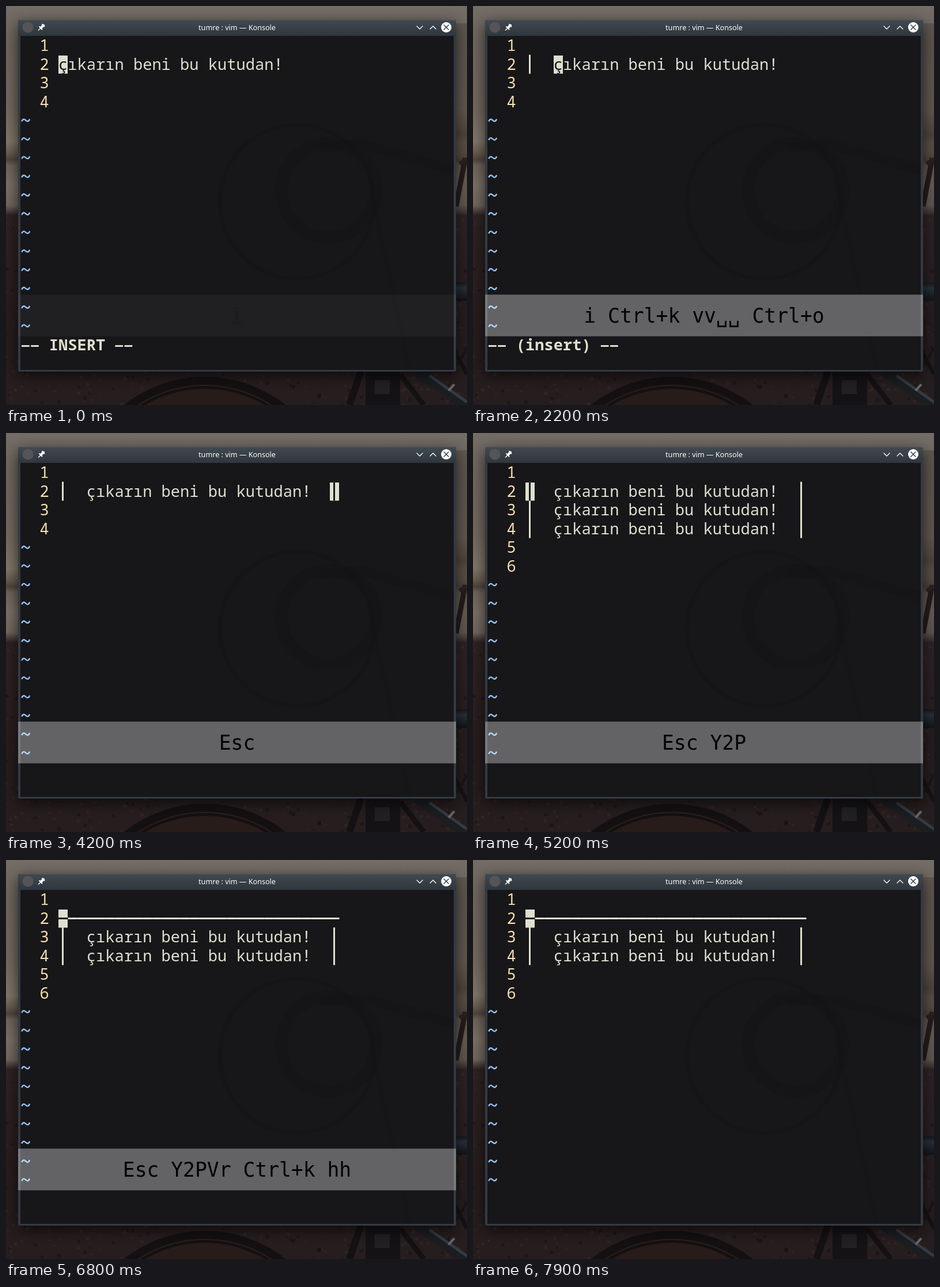
An HTML page with a canvas for the animation above (8 s loop, 800 px wide and 693 px high).

```html
<!DOCTYPE html>
<html lang="tr">
<head>
<meta charset="utf-8">
<title>vim box drawing</title>
<style>
html, body { margin: 0; width: 100%; height: 100%; overflow: hidden; background: #221a1c; }
canvas { display: block; }
</style>
</head>
<body>
<canvas id="stage" width="800" height="693"></canvas>
<script>
const W = 800, H = 693, LOOP = 8000, STEP = 100;
const CELL = 16.24, LINE = 32.45, LEFT = 26, TOP = 52.2, GUTTER = 4, SCREEN_ROWS = 16;
const INK = '#dfdfcf', PAPER = '#171619', NUMBER = '#f5e0ae', TILDE = '#94c4f4', SPECIAL = '#5fd7ff';
const PHRASE = 'çıkarın beni bu kutudan!';

// Key presses: time, label (a leading space separates groups)
const KEYS = [
  [0, 'i'], [500, ' Ctrl+k'], [800, ' v'], [900, 'v'], [1400, '␣'], [1600, '␣'],
  [2000, ' Ctrl+o'], [2300, ' A'], [2500, '␣'], [2700, '␣'],
  [3000, ' Ctrl+k'], [3200, ' v'], [3300, 'v'],
  [4000, 'Esc'], [4400, ' Y'], [4700, '2'], [5100, 'P'], [5700, 'V'],
  [6000, 'r'], [6400, ' Ctrl+k'], [6600, ' h'], [6700, 'h']
];
const FADE = [[0, .12], [100, .65], [200, 1], [3600, 1], [3900, .25], [4000, .15],
  [4100, .8], [4200, 1], [7100, 1], [7500, 0], [8000, 0]];

const canvas = document.getElementById('stage');
let ctx = canvas.getContext('2d');

function rect(x, y, w, h, color) {
  ctx.fillStyle = color;
  ctx.fillRect(x, y, w, h);
}

function disc(x, y, r, color) {
  ctx.fillStyle = color;
  ctx.beginPath();
  ctx.arc(x, y, r, 0, Math.PI * 2);
  ctx.fill();
}

function stroke(points, width, color) {
  ctx.strokeStyle = color;
  ctx.lineWidth = width;
  ctx.beginPath();
  points.forEach(([x, y], i) => i ? ctx.lineTo(x, y) : ctx.moveTo(x, y));
  ctx.stroke();
}

function ring(x, y, r, width, color) {
  ctx.strokeStyle = color;
  ctx.lineWidth = width;
  ctx.beginPath();
  ctx.arc(x, y, r, 0, Math.PI * 2);
  ctx.stroke();
}

function gradient(x0, y0, x1, y1, stops) {
  const g = ctx.createLinearGradient(x0, y0, x1, y1);
  stops.forEach(([at, color]) => g.addColorStop(at, color));
  return g;
}

function seededRandom(seed) {
  return () => (seed = seed * 16807 % 2147483647) / 2147483647;
}

function drawGravel() {
  const random = seededRandom(7);
  for (let i = 0; i < 900; i++) {
    const tone = random() < .5 ? 'rgba(12,8,10,.3)' : 'rgba(74,56,56,.25)';
    disc(random() * W, 366 + random() * 330, 1 + random() * 2.5, tone);
  }
}

function drawBackdrop() {
  rect(0, 0, W, H, gradient(0, 0, 0, H, [
    [0, '#746d66'], [.1, '#6e665f'], [.26, '#74695e'], [.34, '#82776a'], [.368, '#6a5e52'],
    [.385, '#51463e'], [.4, '#6f655a'], [.45, '#7b7166'], [.5, '#71675d'],
    [.525, '#2d2224'], [.6, '#2c2022'], [.8, '#261c1e'], [1, '#261d1e']]));
  rect(400, 30, 400, 330, gradient(400, 0, 800, 0, [[0, 'rgba(60,52,48,0)'], [1, 'rgba(60,52,48,.35)']]));
  rect(770, 180, 30, 85, gradient(0, 180, 0, 265, [
    [0, 'rgba(64,50,42,0)'], [.5, 'rgba(64,50,42,.6)'], [1, 'rgba(64,50,42,0)']]));
  drawGravel();
  // Wheel, crank and frame tubes
  disc(345, 870, 226, '#141012');
  ring(345, 870, 211, 2, '#2a201e');
  disc(345, 870, 205, '#271c1a');
  stroke([[596, 693], [616, 634]], 12, '#131113');
  rect(624, 636, 60, 57, '#141215');
  rect(640, 650, 26, 24, '#222023');
  stroke([[684, 640], [725, 693]], 9, '#131113');
  stroke([[712, 634], [796, 693]], 17, '#1b1d21');
  stroke([[735, 642], [800, 688]], 5, '#333b43');
  stroke([[768, 668], [778, 657]], 4, '#68686a');
  rect(778, 480, 22, 32, gradient(0, 480, 0, 512, [[0, '#16171b'], [.3, '#28313a'], [1, '#121317']]));
  stroke([[781, 348], [797, 264]], 9, '#241c1c');
  stroke([[787, 274], [800, 266]], 7, '#2b2221');
  stroke([[774, 590], [800, 640]], 7, '#141215');
  stroke([[782, 625], [800, 594]], 4, '#171518');
}

function drawWindow() {
  ctx.save();
  ctx.shadowColor = 'rgba(0,0,0,.65)';
  ctx.shadowBlur = 26;
  ctx.shadowOffsetY = 7;
  ctx.fillStyle = '#333a42';
  ctx.beginPath();
  ctx.roundRect(21, 24, 760, 611, [4, 4, 2, 2]);
  ctx.fill();
  ctx.restore();
  ctx.fillStyle = gradient(0, 24, 0, 52, [[0, '#414951'], [1, '#2f363d']]);
  ctx.beginPath();
  ctx.roundRect(21, 24, 760, 28, [4, 4, 0, 0]);
  ctx.fill();
  rect(24, 24, 754, 1, '#4d555d');
  rect(25, 52, 752, 580, PAPER);
  drawGhost();
  drawTitlebar();
}

// Backdrop faintly visible through the terminal
function drawGhost() {
  ring(505, 340, 134, 7, 'rgba(8,7,9,.09)');
  ring(560, 320, 82, 22, 'rgba(8,7,9,.07)');
  stroke([[545, 246], [620, 240], [777, 285]], 18, 'rgba(8,7,9,.07)');
  stroke([[628, 300], [668, 480], [700, 632]], 6, 'rgba(8,7,9,.06)');
}

function drawTitlebar() {
  disc(38, 37, 9.5, '#555557');
  ctx.lineCap = 'round';
  stroke([[56.5, 42], [60, 38.5]], 1.5, '#fcfcfc');
  stroke([[58, 36], [62.5, 40.5]], 2, '#fcfcfc');
  stroke([[61, 37.5], [65, 33.5]], 4, '#fcfcfc');
  stroke([[63, 32], [66.5, 35.5]], 2, '#fcfcfc');
  stroke([[713, 35], [718, 40], [723, 35]], 1.3, '#fcfcfc');
  stroke([[736, 40], [741, 35], [746, 40]], 1.3, '#fcfcfc');
  disc(764, 37, 9, '#fcfcfc');
  stroke([[760, 33], [768, 41]], 1.4, '#31363b');
  stroke([[768, 33], [760, 41]], 1.4, '#31363b');
  ctx.lineCap = 'butt';
  ctx.font = '12.6px "Noto Sans", sans-serif';
  ctx.textAlign = 'center';
  ctx.fillStyle = '#fcfcfc';
  ctx.fillText('tumre : vim — Konsole', 401, 42);
}

function glyph(ch, col, row, color, bold) {
  const x = LEFT + col * CELL, y = TOP + row * LINE, mid = y + LINE / 2;
  ctx.fillStyle = color;
  if (ch === '│') {
    rect(Math.floor(x + CELL / 2 - 1.5), y, 3, LINE + .5, color);
  } else if (ch === '─') {
    rect(x, Math.round(mid - 1), CELL + .3, 3, color);
  } else if (ch === '-') {
    rect(x + 1, Math.round(mid + 1), 13.6, 3, color);
  } else if (ch === '~') {
    ctx.strokeStyle = color;
    ctx.lineWidth = 2.4;
    ctx.beginPath();
    ctx.moveTo(x + 1.2, mid + 2.2);
    ctx.bezierCurveTo(x + 4, mid - 4, x + 7, mid - .8, x + 8.2, mid + .3);
    ctx.bezierCurveTo(x + 9.5, mid + 1.4, x + 12.5, mid + 4.5, x + 15.1, mid - 1.8);
    ctx.stroke();
  } else if (ch !== ' ') {
    ctx.font = (bold ? 'bold ' : '') + '27px "Noto Sans Mono", monospace';
    ctx.textAlign = 'center';
    ctx.fillText(ch, x + CELL / 2, mid + 10);
  }
}

function write(text, col, row, color, bold) {
  [...text].forEach((ch, i) => glyph(ch, col + i, row, color, bold));
}

function between(t, from, to) {
  return t >= from && t < to;
}

function editorAt(t) {
  const after = ms => Number(t >= ms);
  const prefix = '│'.repeat(after(900)) + ' '.repeat(after(1400) + after(1600));
  const suffix = ' '.repeat(after(2500) + after(2700)) + '│'.repeat(after(3300));
  const text = prefix + PHRASE + suffix;
  const pasted = t >= 5100;
  const first = t >= 6700 ? '─'.repeat(text.length) : text;

  let col = prefix.length;
  if (t >= 2300) col = text.length - after(4000);
  if (pasted) col = 0;

  let pending = '';
  if (between(t, 500, 800) || between(t, 3000, 3200)) pending = '?';
  if (between(t, 800, 900) || between(t, 3200, 3300)) pending = 'v';

  let status = '';
  if (t < 4000) status = between(t, 2000, 2300) ? '-- (insert) --' : '-- INSERT --';
  if (between(t, 5700, 6700)) status = '-- VISUAL LINE --';

  return {
    lines: pasted ? ['', first, text, text, '', ''] : ['', first, '', ''],
    col, pending, status, selected: between(t, 5700, 6700)
  };
}

function drawEditor({ lines, col, pending, status, selected }) {
  if (selected) {
    rect(LEFT + GUTTER * CELL, TOP + LINE, (lines[1].length + 1) * CELL, LINE, '#6b6a6c');
  }
  for (let row = 0; row < SCREEN_ROWS; row++) {
    if (row < lines.length) {
      glyph(String(row + 1), 2, row, NUMBER);
      write(lines[row], GUTTER, row, INK);
    } else {
      glyph('~', 0, row, TILDE);
    }
  }
  const cell = GUTTER + col;
  rect(Math.round(LEFT + cell * CELL), 86, 16, 31.5, pending ? SPECIAL : INK);
  glyph(pending || lines[1][col] || ' ', cell, 1, PAPER);
  write(status, 0, SCREEN_ROWS, INK, true);
}

function fadeAt(t) {
  const i = FADE.findIndex(([at]) => at > t);
  const [t0, a] = FADE[i - 1], [t1, b] = FADE[i];
  return a + (b - a) * (t - t0) / (t1 - t0);
}

function drawKeys(t) {
  const alpha = fadeAt(t);
  if (alpha <= 0) return;
  const since = t < 4000 ? 0 : 4000;
  const pressed = KEYS.filter(([at]) => between(at, since, t + 1));
  const text = pressed.map(key => key[1]).join('');
  const [lastTime, lastKey] = pressed[pressed.length - 1];

  ctx.save();
  ctx.globalAlpha = alpha;
  rect(21, 501.3, 760, 72.4, 'rgba(255,255,255,.33)');
  ctx.font = '34.67px "DejaVu Sans Mono", monospace';
  ctx.textAlign = 'left';
  ctx.fillStyle = '#000';
  const width = ctx.measureText(text).width, x = 401 - width / 2;
  ctx.fillText(text, x, 550);
  if (t - lastTime < STEP) {
    const under = ctx.measureText(lastKey.trim()).width;
    rect(x + width - under, 551, under, 1.6, '#000');
  }
  ctx.restore();
}

function makeScene() {
  const layer = document.createElement('canvas');
  layer.width = W;
  layer.height = H;
  const screen = ctx;
  ctx = layer.getContext('2d');
  drawBackdrop();
  drawWindow();
  ctx = screen;
  return layer;
}

const scene = makeScene();

function frame() {
  const t = Math.floor(performance.now() % LOOP / STEP) * STEP;
  ctx.drawImage(scene, 0, 0);
  drawEditor(editorAt(t));
  drawKeys(t);
  requestAnimationFrame(frame);
}
frame();
</script>
</body>
</html>
```
